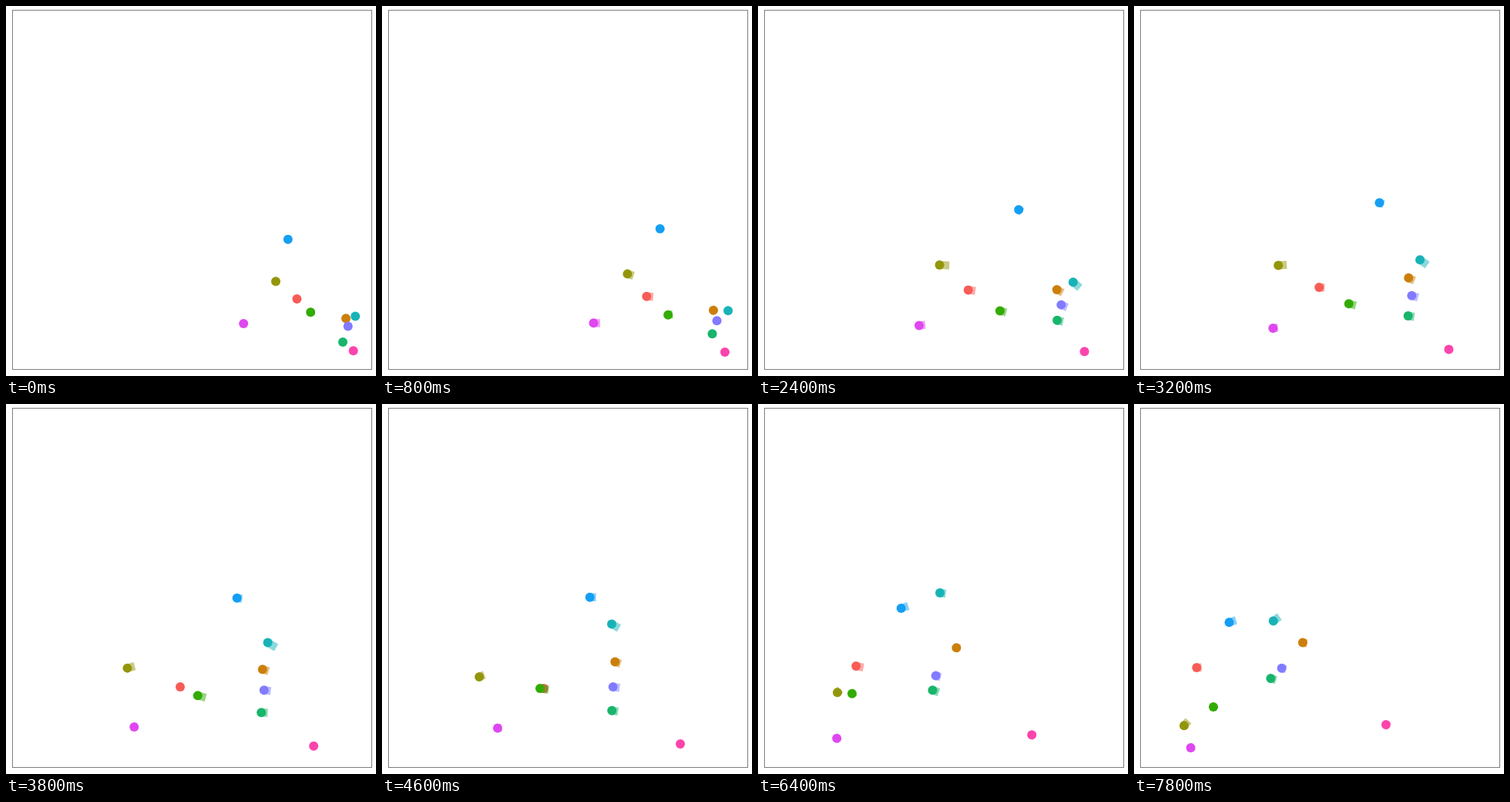
Write an HTML page with a canvas that moves like this. It is 480 px wide and 480 px high and loops after 8 s.

```html
<!DOCTYPE html>
<html lang="en">
<head>
<meta charset="utf-8">
<title>Moving dots</title>
<style>
  html, body { margin: 0; width: 100%; height: 100%; overflow: hidden; background: #fff; }
  canvas { display: block; width: 480px; height: 480px; }
</style>
</head>
<body>
<canvas id="stage" width="480" height="480"></canvas>
<script>
const STEP_MS = 200;
const STEPS = 40;
const RADIUS = 6;
const TRAIL_WIDTH = 10.4;

// Each dot glides through a few key points, reached at these steps.
const KEY_STEPS = [0, 8, 16, 23, 28, 32, 39];
const dots = [
  { color: '#f85c56', path: '377.4,380 309.2,373.2 240.2,365 209.7,369 170.4,352.2 127.2,340 81.3,342' },
  { color: '#cc7f0c', path: '441,405.3 414.8,383.2 356.2,352.7 302.3,334.5 272,322.6 257.4,316.3 218.9,309.6' },
  { color: '#93960a', path: '350,357.2 283.2,339.8 187.2,336.5 126.2,354 114,364 103,374.3 65,417.2' },
  { color: '#32ac04', path: '395.2,397.2 345,401.7 278.7,386.2 205,369 144.7,370.8 122,375.7 103,393' },
  { color: '#18b56b', path: '437,436 415.2,415.5 355.6,402 298.2,397.8 260.2,384.4 226.5,371.2 177.4,356' },
  { color: '#18b3b7', path: '453.2,402.4 438.2,383.5 371,329.2 298,285.4 265,263.3 236,245 180.8,281.4' },
  { color: '#149ff4', path: '365.8,302.7 352.9,276 318.4,255.2 269.7,250.7 223,254 185.7,264.9 123.5,283.2' },
  { color: '#827bff', path: '443.7,415.4 420.6,400 360.3,375.8 299.7,367 258.5,359.2 230.7,352.6 191.6,342.8' },
  { color: '#df47f0', path: '308.2,412 241.5,411.4 180.3,418 150,420.5 117.2,428.7 102.2,433.7 73.6,446' },
  { color: '#fc44ad', path: '450.6,447.3 437.2,450 408.4,445.4 387,441 368.6,436 355.2,429.3 326.9,416' },
].map(({ color, path }) => ({
  color,
  points: path.split(' ').map(pair => pair.split(',').map(Number)),
}));

function slope(points, i, axis) {
  const from = Math.max(i - 1, 0);
  const to = Math.min(i + 1, points.length - 1);
  return (points[to][axis] - points[from][axis]) / (KEY_STEPS[to] - KEY_STEPS[from]);
}

// Smooth curve through the key points
function position({ points }, step) {
  const next = Math.max(1, KEY_STEPS.findIndex(key => key >= step));
  const i = next - 1;
  const span = KEY_STEPS[next] - KEY_STEPS[i];
  const s = (step - KEY_STEPS[i]) / span;
  const blend = s * s * (3 - 2 * s);
  return [0, 1].map(axis => {
    const a = points[i][axis];
    const b = points[next][axis];
    const bend = (1 - s) * slope(points, i, axis) - s * slope(points, next, axis);
    return a + (b - a) * blend + span * s * (1 - s) * bend;
  });
}

const ctx = document.getElementById('stage').getContext('2d');

function drawDot(dot, step) {
  ctx.fillStyle = dot.color;
  ctx.beginPath();
  ctx.arc(...position(dot, step), RADIUS, 0, 2 * Math.PI);
  ctx.fill();
}

function drawTrail(dot, step) {
  ctx.strokeStyle = dot.color;
  ctx.beginPath();
  ctx.moveTo(...position(dot, step));
  ctx.lineTo(...position(dot, step - 1));
  ctx.stroke();
}

function draw(step) {
  ctx.fillStyle = '#fff';
  ctx.fillRect(0, 0, 480, 480);
  ctx.strokeStyle = '#7f7f7f';
  ctx.lineWidth = 1;
  ctx.strokeRect(8.5, 5.5, 466, 466);

  dots.forEach(dot => drawDot(dot, step));
  if (step === 0) return;

  ctx.globalAlpha = .5;
  ctx.lineWidth = TRAIL_WIDTH;
  dots.forEach(dot => drawTrail(dot, step));
  ctx.globalAlpha = 1;
}

const start = performance.now();
function tick() {
  draw(Math.floor((performance.now() - start) / STEP_MS) % STEPS);
  requestAnimationFrame(tick);
}
tick();
</script>
</body>
</html>
```
